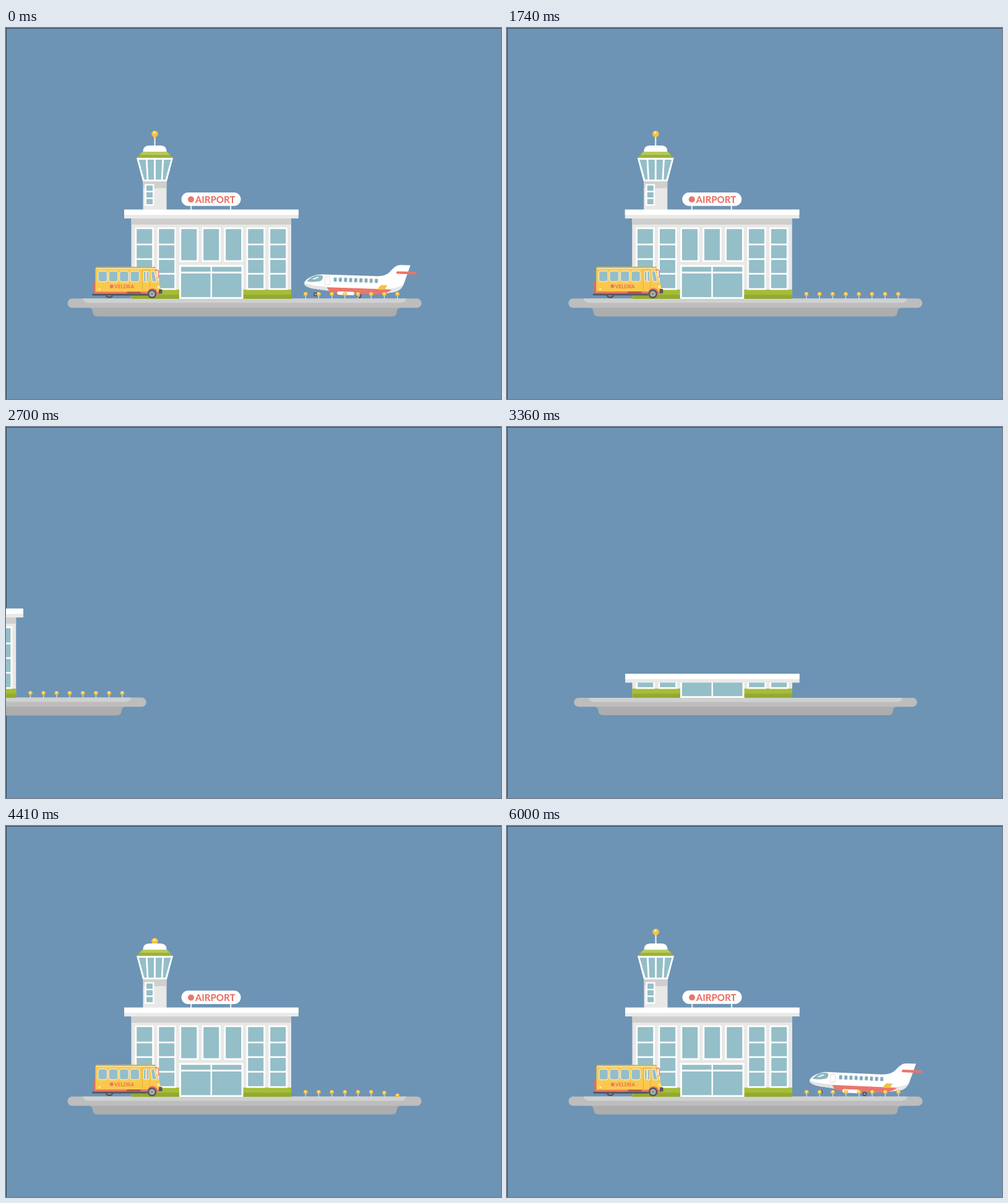
An HTML page that plays this animation: 800 px wide and 600 px high, repeating every 6.03 s.

```html
<!DOCTYPE html>
<html lang="en">
<head>
<meta charset="utf-8">
<title>Airport</title>
<style>
html, body { margin: 0; width: 100%; height: 100%; overflow: hidden; background: #6d94b5; }
svg { display: block; width: 800px; height: 600px; }
text { font-family: Lato, "Open Sans", sans-serif; font-weight: 700; fill: #e96a5f; }
</style>
</head>
<body>
<svg id="stage" viewBox="0 0 800 600"></svg>
<script>
const LOOP = 6030, STEP = 30, EMPTY = 2820;
const WHITE = '#fff', WALL = '#e8e8e6', SHADE = '#cfcfcf', GLASS = '#94bec8',
      CORAL = '#e9766b', YELLOW = '#fac94c', DARK = '#56575c', FRAME = '#34495a';

const rect = (x, y, w, h, fill, r = 0, more = '') =>
  `<rect x="${x}" y="${y}" width="${w}" height="${h}" rx="${r}" fill="${fill}" ${more}/>`;
const path = (d, fill, more = '') => `<path d="${d}" fill="${fill}" ${more}/>`;
const line = (d, stroke, w) => path(d, 'none', `stroke="${stroke}" stroke-width="${w}" stroke-linecap="round"`);
const disc = (x, y, r, fill) => `<circle cx="${x}" cy="${y}" r="${r}" fill="${fill}"/>`;
const group = (id, body, more = '') => `<g id="${id}" ${more}>${body}</g>`;
const repeat = (n, f) => Array.from({ length: n }, (_, i) => f(i)).join('');

function platform() {
  return path('M134 452H638Q632 453 631.5 459Q631 466.5 624 466.5H148Q140.5 466.5 140 459Q139.5 453 134 452Z', '#adadad') +
    rect(99.5, 437.5, 572, 15, '#bdbdbd', 7.5) +
    path('M124 437.5H647Q645 444.5 638 444.5H133Q126 444.5 124 437.5Z', '#cfd0d0');
}

function tower() {
  const antenna = rect(239.4, 175, 2.2, 20, '#e9eef0') + disc(240.5, 171.3, 5.3, '#f8c33f') + disc(240, 169.3, 1.7, '#fdeeb8');
  const divider = i => line(`M${227.2 + 13.3 * i} 212L${229 + 11.5 * i} 246`, WHITE, 2.8);
  return group('antenna', antenna) +
    rect(221.5, 246, 38, 50, WALL) + rect(221.5, 247, 38, 12, SHADE) +
    rect(224, 252.5, 15.5, 35, WHITE) +
    repeat(3, i => rect(227, 254.7 + 10.9 * i, 10, 8.5, GLASS)) +
    path('M211 210H270L260 248H221Z', WHITE) + path('M214.5 213H266.5L257.5 245.3H223.5Z', GLASS) +
    repeat(3, divider) +
    path('M221 200H260L270 210H211Z', '#9bb335') + path('M221 200H260L265 205H216Z', '#b7c95d') +
    path('M221.5 200Q221.5 190 231.5 190H249.5Q259.5 190 259.5 200Z', WHITE);
}

function sign() {
  return repeat(2, i => rect(298 + 64 * i, 287, 2.2, 8, '#e6ecef')) +
    rect(283.5, 266, 96, 21.8, WHITE, 10.9) + disc(299, 277.3, 5, CORAL) +
    '<text x="305.8" y="282.7" font-size="15.1">AIRPORT</text>';
}

function walls() {
  const column = i => {
    const x = 208.5 + 36 * i, tall = i > 1 && i < 5, bottom = tall ? 378.3 : 423.5;
    const bar = j => rect(x, 348.7 + 23.7 * j, 30.5, 2.7, WHITE);
    return rect(x, 322.5, 30.5, bottom - 322.5, WHITE) +
      rect(x + 2.7, 325.2, 25, bottom - 327.9, GLASS) + (tall ? '' : repeat(3, bar));
  };
  const door = i => rect(283 + 50 * i, 386.3, 47.5, 7.7, GLASS) + rect(283 + 50 * i, 397, 47.5, 38.3, GLASS);
  return rect(202.5, 300, 258.5, 138, WALL) + rect(202.5, 307, 258.5, 11, SHADE) +
    rect(202.5, 423.3, 258.5, 15, '#93aa30') + rect(202.5, 423.3, 258.5, 8, '#a5bd37') +
    repeat(7, column) + rect(280, 383, 103.5, 55, WHITE) + repeat(2, door);
}

const roof = () => rect(191, 293.7, 281.7, 14.3, '#eaeae8') + rect(191, 293.7, 281.7, 8.5, WHITE);

function lamp(i) {
  const x = 484.2 + 21.2 * i;
  return group('lamp' + i, rect(x - .6, 432, 1.2, 7, '#dfe6e8') +
    disc(x, 430.2, 3.3, '#f3bd40') + disc(x - .3, 429.4, 1.4, '#fdeeb8'));
}

function bus() {
  const trim = 'stroke="#ece6cb" stroke-width="1.5" stroke-linejoin="round"';
  const pane = i => rect(148.7 + 17.4 * i, 393.3, 14.8, 17.3, GLASS, 4, trim);
  const doorPane = i => rect(222.3 + 4.9 * i, 393.5, 3.8, 17, GLASS, 1.5, trim);
  const body = rect(140.8, 411, 4.5, 17, '#d8705f', 1.5) +
    path('M144.5 389Q144.5 387 147 387H239Q242 387 242.5 390L246.5 411Q249.5 414 249.5 421V431H144.5Z', YELLOW) +
    rect(145, 386.3, 97, 2, '#d9b04a', 1) + rect(146, 388.6, 96, 1.2, '#fdeebc') +
    repeat(4, pane) +
    path('M220.5 391.5H232V429H220.5Z', 'none', 'stroke="#e2b03c"') + repeat(2, doorPane) +
    path('M234 393.5H239.5L243.5 410.5H236.5Z', GLASS, trim) +
    line('M241 391.5H244.5Q246.5 392 246.5 395V404', CORAL, 1.5) +
    rect(242.5, 396, 3, 6, '#f5e6e3', 1) +
    path('M144.5 426.5H229Q231 421 237 421Q243 421 245 427H249.5V431H144.5Z', CORAL) +
    rect(195, 426.5, 23, 3, '#a95850', 1.5) +
    rect(149.5, 421.3, 3, 2.6, '#fdf0d0', 1) + disc(246.5, 419, 2, '#fdeebc') +
    rect(139, 429.8, 90, 3, DARK, 1.5) + rect(247, 422.5, 5.5, 7, DARK, 1.5) +
    disc(170.7, 418, 3, CORAL) +
    '<text x="175" y="421.1" font-size="8.2">VELDRA</text>';
  return disc(167, 430, 7, DARK) + disc(167, 430, 4, '#a9a9a9') + group('busBody', body) +
    disc(236, 430, 7.3, DARK) + disc(236, 430, 4.6, '#b4b4b4') + disc(236, 430, 2.2, '#8d8d8f');
}

// Drawn level; the main wheel is the pivot.
function plane() {
  const wheel = (x, r) => line(`M${x} 424V433`, '#8b8f94', 1.6) + disc(x, 433.3, r, DARK) + disc(x, 433.3, 1.4, '#b4b4b4');
  const port = i => rect(528.6 + 8.3 * i, 404.5, 5.4, 7.2, '#7fa9b9', 1.6, 'stroke="#e3e8ea"');
  const hull = 'M481.5 415.5Q482 410 492 405Q500 400.5 511 400.5H597Q611 400.5 618 394Q626 384 631 382Q634 381 637 381H652L642.5 411Q638 425 622 426Q600 431 566 429L505 425Q481 423 481.5 415.5Z';
  return group('gear', wheel(500, 3.3) + wheel(571, 3.6)) +
    path(hull, WHITE) +
    path('M481.5 416Q496 420 519 420L523 427L505 425Q481 422 481.5 416Z', '#e2e3e3') +
    path('M622 426Q638 425 642.5 411Q636 419 616 420L611 428Z', '#e6e7e7') +
    path('M518.5 421H615L623 421.5Q613 430 596 430H532Q521 430 518.5 421Z', CORAL) +
    path('M599 422L605.5 414.5H615.5L612 422Z', '#f6c042') +
    rect(535, 427, 28, 5.6, WHITE, 2.8) +
    path('M485.5 412.5Q493 403 504 402H509Q512 403 511 407Q510 411 505 412Q495 414 485.5 412.5Z', '#8db5c0') +
    line('M496 408.5L503.5 405.5', '#eef5f6', 2) +
    rect(514.5, 404, 8.2, 13, WHITE, 3, 'stroke="#efd9d8"') +
    repeat(9, port) + rect(629.5, 391.4, 33, 4.2, CORAL, 2);
}

document.getElementById('stage').innerHTML =
  `<defs><clipPath id="ground">${rect(-800, 0, 1600, 438, WHITE)}</clipPath>
   <clipPath id="wallClip"><rect id="wallBox" x="190" y="294" width="290" height="300"/></clipPath></defs>` +
  rect(0, 0, 800, 600, '#6d94b5') + rect(0, 0, 800, 1, FRAME) + rect(0, 0, 1, 600, FRAME) +
  group('scene',
    group('plane', plane()) +
    group('base', platform()) +
    group('build',
      group('tower', tower()) + group('sign', sign()) +
      group('walls', walls(), 'clip-path="url(#wallClip)"') +
      group('roof', roof()) + repeat(8, lamp) + group('bus', bus()),
      'clip-path="url(#ground)"'));

const el = id => document.getElementById(id);
const put = (id, value) => el(id).setAttribute('transform', value);
const move = (id, x, y) => put(id, `translate(${x} ${y})`);

// Time runs on past the loop, from the empty stage to the slide out.
function draw(time) {
  const t = time < EMPTY ? time + LOOP : time;
  const part = (start, span) => Math.min(1, Math.max(0, (t - start) / span));
  const settle = (from, start, span) => from * (1 - part(start, span)) ** 2;

  move('scene', -672 * part(7679, 1206) ** 3, 0);
  put('base', `translate(385.5 452) scale(${1 - settle(1, 3030, 400)}) translate(-385.5 -452)`);

  const lift = settle(146, 3240, 800);
  move('roof', 0, lift);
  el('wallBox').setAttribute('y', 294 + lift);
  move('tower', 0, settle(252, 3262, 1111));
  move('antenna', 0, settle(26, 4230, 750));
  move('sign', 0, lift + settle(30, 4000, 450));
  for (let i = 0; i < 8; i++) move('lamp' + i, 0, settle(12, 3460 + 120 * i, 350));

  const shake = time / STEP % 4 > 1 ? -.4 : 0;
  const tilt = -2 * Math.sin(Math.PI * part(3570, 330));
  move('bus', 0, settle(56, 3360, 330));
  put('busBody', `translate(0 ${shake}) rotate(${tilt} 167 432)`);

  // Steady approach, then braking from the loop point until it stops behind the building.
  const run = Math.min(t - LOOP, 2124);
  const x = -.2294 * run + 5.4e-5 * Math.max(0, run) ** 2;
  const y = -43 * (Math.max(0, 5910 - t) / 750) ** 1.2;
  put('plane', `translate(${x} ${y}) rotate(${4.4 * (1 - part(5910, 210))} 571 433)`);
  const folded = 1 - part(5250, 300);
  move('gear', 11 * folded, -6 * folded);
}

const start = performance.now();
function tick() {
  const t = (performance.now() - start) % LOOP;
  draw(Math.floor(t / STEP) * STEP);
  requestAnimationFrame(tick);
}
tick();
</script>
</body>
</html>
```
